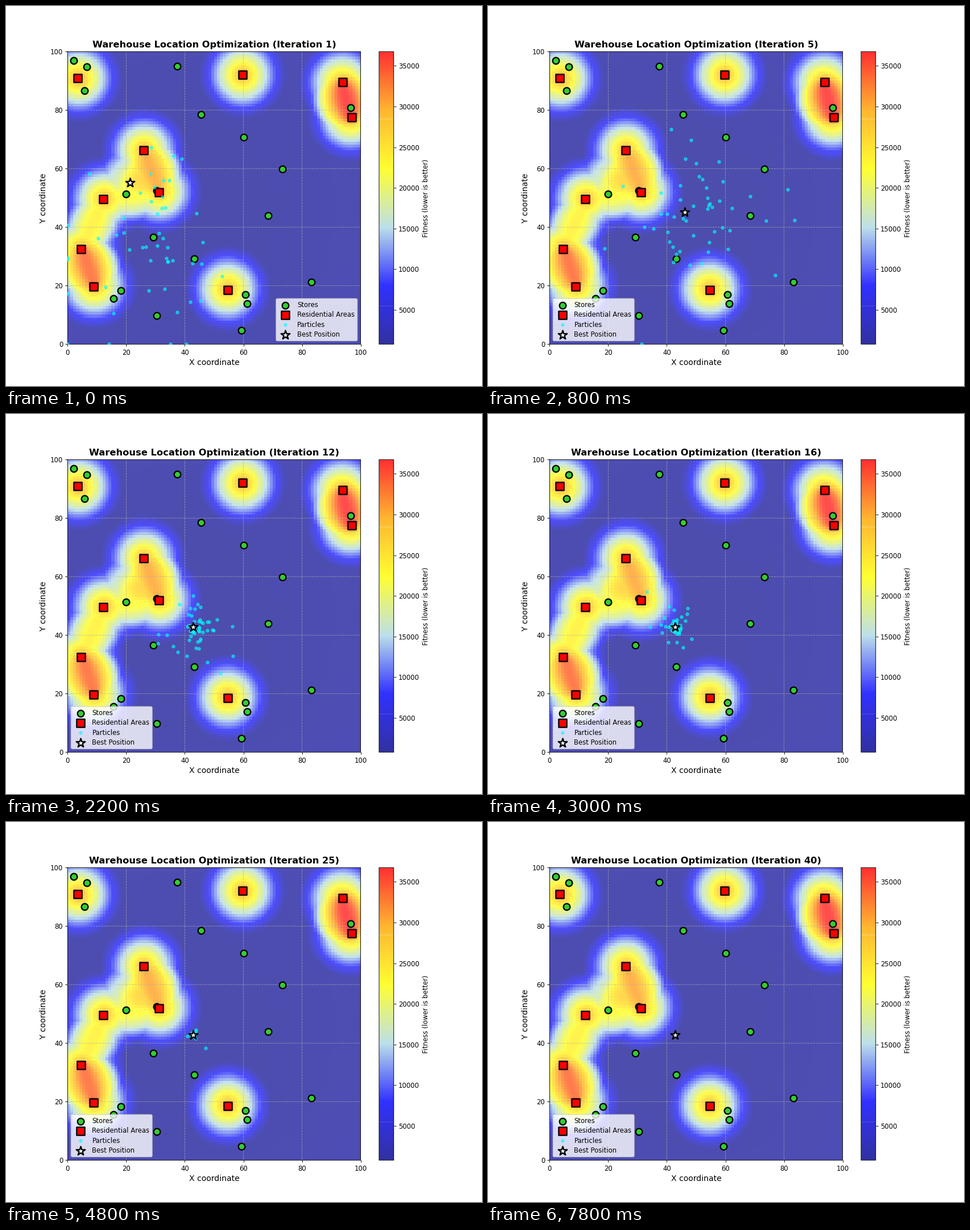
A matplotlib script for the animation above (8000 ms loop, 837 by 669 pixels).

```python
import numpy as np
import matplotlib.pyplot as plt
from matplotlib.animation import FuncAnimation
from matplotlib.colors import LinearSegmentedColormap

W, H, DPI = 837, 669, 83.7
STEPS, STEP_MS = 40, 200
SWARM = 50

# Soft, unsnapped edges
plt.rcParams["path.snap"] = False

# Site map: stores attract, homes add a penalty within 15 units
np.random.seed(42)
stores = np.random.rand(20, 2) * 100
homes = np.random.rand(10, 2) * 100


def distances(sites, x, y):
    return np.hypot(x[..., None] - sites[:, 0], y[..., None] - sites[:, 1])


def fitness(x, y):
    travel = distances(stores, x, y).sum(axis=-1)
    noise = np.maximum(0, 15 - distances(homes, x, y)).sum(axis=-1)
    return travel + 2000 * noise


# Best position, held from the given iteration on
BEST = [(1, (21.3, 55.3)), (2, (46.1, 45.1)), (7, (42, 42.7)), (11, (42.9, 42.7))]

# Swarm centre drifts through these points to the optimum
CENTRE_AT = (1, 5, 9, 14)
CENTRE_X = (33, 47, 45, 42.9)
CENTRE_Y = (38, 43.5, 43, 42.7)

# Each particle circles the centre on its own ellipse while it closes in
rng = np.random.default_rng(7)
axis_a, axis_b = 15 * rng.standard_t(3, (2, SWARM, 2))
turn = rng.uniform(0.6, 2, (SWARM, 1))
settle = 9 * rng.lognormal(0, 0.25, (SWARM, 1))


def swarm_at(it):
    t = it - 1
    centre = [np.interp(it, CENTRE_AT, c) for c in (CENTRE_X, CENTRE_Y)]
    orbit = axis_a * np.cos(turn * t) + axis_b * np.sin(turn * t)
    return np.clip(centre + orbit * np.exp(-(t / settle) ** 1.6), 0, 100)


def best_at(it):
    return [p for since, p in BEST if since <= it][-1]


fig, ax = plt.subplots(figsize=((W + 1e-4) / DPI, (H + 1e-4) / DPI), dpi=DPI)

grid = np.linspace(0, 100, 100)
cmap = LinearSegmentedColormap.from_list(
    "fitness", ["darkblue", "blue", "lightblue", "yellow", "orange", "red"])
heat = ax.imshow(fitness(*np.meshgrid(grid, grid)), extent=(0, 100, 0, 100),
                 origin="lower", cmap=cmap, alpha=0.7)
fig.colorbar(heat, ax=ax, label="Fitness (lower is better)")

outline = dict(edgecolors="black", linewidths=2)
ax.scatter(*stores.T, s=100, c="limegreen", label="Stores", zorder=3, **outline)
ax.scatter(*homes.T, s=150, c="red", marker="s", label="Residential Areas",
           zorder=3, **outline)
swarm = ax.scatter(*swarm_at(1).T, s=20, c="cyan", alpha=0.6,
                   label="Particles", zorder=4)
star = ax.scatter(*best_at(1), s=200, c="white", marker="*",
                  label="Best Position", zorder=5, **outline)

ax.set(xlim=(0, 100), ylim=(0, 100))
ax.set_xlabel("X coordinate", fontsize=12)
ax.set_ylabel("Y coordinate", fontsize=12)
ax.grid(True, linestyle="--", alpha=0.7)
title = ax.set_title("", fontsize=14, fontweight="bold")
legend = ax.legend(loc="lower right", labelspacing=0.38)


def update(i):
    it = i + 1
    swarm.set_offsets(swarm_at(it))
    star.set_offsets([best_at(it)])
    legend.set_loc("lower right" if it < 3 else "lower left")
    title.set_text(f"Warehouse Location Optimization (Iteration {it})")
    return swarm, star, legend, title


anim = FuncAnimation(fig, update, frames=STEPS, interval=STEP_MS,
                     repeat=True, repeat_delay=0, blit=False)
plt.show()
```
